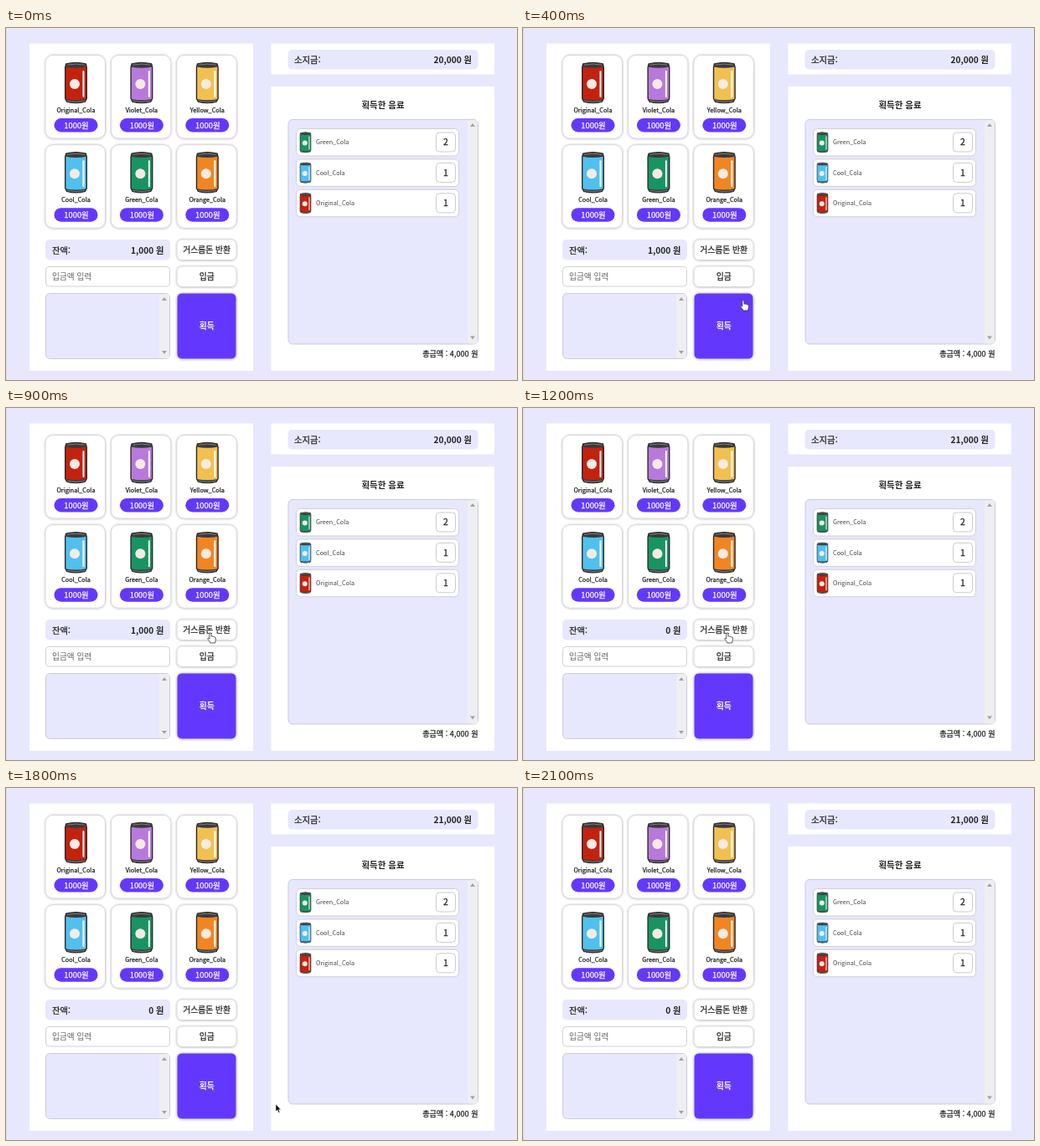
Recreate the animation shown at these times as an HTML page. Size 610 px wide and 421 px high, loop 3 s.

```html
<!DOCTYPE html>
<html lang="ko">
<head>
<meta charset="utf-8">
<style>
  html, body { margin: 0; width: 100%; height: 100%; overflow: hidden; background: #e7e8fd; }
  svg { display: block; width: 610px; height: 421px; }
  text { font-family: "Noto Sans CJK KR", "Noto Sans CJK JP", "Noto Sans", sans-serif; }
  .medium { stroke: currentColor; stroke-width: .25px; }
</style>
</head>
<body>
<svg id="stage" viewBox="0 0 610 421">
  <defs>
    <g id="can">
      <path d="M-12.8 6L-11.8 2Q0-1 11.8 2L12.8 6V43.5L11 47Q0 50 -11 47L-12.8 43.5Z" fill="currentColor" stroke="#2a2a2a" stroke-width="1.4" stroke-linejoin="round"/>
      <path d="M-12.5 5.6L-11.5 2Q0-1 11.5 2L12.5 5.6Q0 8 -12.5 5.6ZM-12.5 44Q0 46.6 12.5 44L11 47Q0 50 -11 47Z" fill="#3a3a3a"/>
      <path d="M-10.5 3.2Q0 .8 10.5 3.2M-10.5 46.2Q0 48.6 10.5 46.2" fill="none" stroke="#8d8d8d" stroke-width=".8"/>
      <path d="M9 11V41" stroke="#fff" stroke-width="2" stroke-linecap="round"/>
      <circle cx="-1.5" cy="26" r="6" fill="#f5ebe4"/>
    </g>
    <filter id="soft" x="-10%" y="-20%" width="120%" height="140%">
      <feDropShadow dx="0" dy=".3" stdDeviation="1.1" flood-color="#000" flood-opacity=".3"/>
    </filter>
  </defs>
  <g id="page"></g>
  <path id="hand" d="M-1.2 7.2V.9C-1.2-.5 1-.5 1 .9V4.3C1.4 3.6 2.8 3.7 3 4.6C3.5 4 4.6 4.3 4.8 5.1C5.5 4.7 6.3 5.1 6.3 6V8.6C6.3 10 5.5 10.5 5.4 12H-.2C-.4 10.5-2.1 9.3-3.1 7.2C-3.6 6-2.2 5.7-1.2 7.2Z" fill="#fff" stroke="#333" stroke-width=".8" stroke-linejoin="round"/>
  <path id="arrow" d="M0 0V9L2 7.2L3.4 10.4L4.9 9.7L3.5 6.7H6.2Z" fill="#111" stroke="#fff" stroke-width=".5"/>
</svg>
<script>
const $ = id => document.getElementById(id);
const LILAC = '#e7e8fd', PURPLE = '#6338fc', LINE = '#d2d2d6';
const COLORS = {
  Original: '#c3220f', Violet: '#b879dc', Yellow: '#f2c050',
  Cool: '#50c0ee', Green: '#189463', Orange: '#f18522'
};
let markup = '';

function box(x, y, w, h, fill, radius = 0, extra = '') {
  markup += `<rect x="${x}" y="${y}" width="${w}" height="${h}" rx="${radius}" fill="${fill}" ${extra}/>`;
}
function text(x, y, str, size, { anchor = 'start', weight = 400, fill = '#222', id = '' } = {}) {
  const style = weight === 500 ? 'class="medium"' : `font-weight="${weight}"`;
  markup += `<text x="${x}" y="${y}" font-size="${size}" text-anchor="${anchor}" ${style} fill="${fill}" color="${fill}" id="${id}">${str}</text>`;
}
function can(x, y, name, scale = 1) {
  markup += `<use href="#can" transform="translate(${x} ${y}) scale(${scale})" color="${COLORS[name]}"/>`;
}
const outline = (color = LINE, width = 1) => `stroke="${color}" stroke-width="${width}"`;
const raised = outline('#d8d8dc') + ' filter="url(#soft)"';

function scrollArea(x, y, w, h) {
  box(x + .5, y + .5, w - 1, h - 1, LILAC, 5, outline('#cacadb'));
  box(x + w - 13, y + 1, 12, h - 2, '#efeff1', 3);
  const cx = x + w - 7, bottom = y + h - 10;
  markup += `<path d="M${cx - 3} ${y + 9}l3-4l3 4ZM${cx - 3} ${bottom}l3 4l3-4Z" fill="#a3a3a6"/>`;
}

box(0, 0, 1, 421, '#d9daee');
box(28, 18.5, 267, 391.5, '#fff');
box(316.5, 18.5, 266.5, 37, '#fff');
box(316.5, 70, 266.5, 340, '#fff');

Object.keys(COLORS).forEach((name, i) => {
  const x = 47 + i % 3 * 78.4, y = 32.5 + Math.floor(i / 3) * 107.2, mid = x + 36;
  box(x, y, 71.5, 99.5, '#fff', 9, raised);
  can(mid + .5, y + 8.5, name);
  text(mid + .5, y + 68.5, name + '_Cola', 7.25, { anchor: 'middle', weight: 500 });
  box(mid - 25.5, y + 75.5, 52, 16.5, PURPLE, 8.25);
  text(mid + 1, y + 87.7, '1000원', 9.4, { anchor: 'middle', weight: 500, fill: '#fff' });
});

box(47, 253, 149, 24.5, LILAC, 5);
text(55, 269.7, '잔액:', 10.3, { weight: 500 });
text(188.5, 269.7, '', 10.2, { anchor: 'end', weight: 700, id: 'balance' });
box(47.5, 285.5, 148, 23.5, '#fff', 4, outline());
text(55, 300.5, '입금액 입력', 9.7, { fill: '#666' });
scrollArea(47, 317, 149, 79);

[[253, 24.5, '거스름돈 반환'], [285, 24.5, '입금'], [317, 79, '획득']].forEach(([y, h, label], i) => {
  const main = i === 2;
  box(204, y, 71, h, main ? PURPLE : '#fff', 6, raised);
  text(239.7, y + h / 2 + 3.3, label, 9.8,
    { anchor: 'middle', weight: main ? 700 : 500, fill: main ? '#fff' : '#222' });
});

box(336.5, 26, 227, 23.5, LILAC, 5);
text(344, 41.7, '소지금:', 10.4, { weight: 500 });
text(556, 41.7, '', 10.2, { anchor: 'end', weight: 700, id: 'wallet' });
text(450, 96.3, '획득한 음료', 10.5, { anchor: 'middle', weight: 700 });
scrollArea(336.5, 109, 227.5, 269.5);

[['Green', 2], ['Cool', 1], ['Original', 1]].forEach(([name, count], i) => {
  const y = 120.5 + i * 36.4;
  box(346.5, y, 194, 32.5, '#fff', 5, outline('#cfcfd8'));
  can(357.5, y + 4, name, .5);
  text(370, y + 18.8, name + '_Cola', 7.25, { fill: '#444' });
  box(513.5, y + 4.5, 23, 23, '#fff', 4, outline('#cbcbcf'));
  text(525, y + 19.8, count, 10.5, { anchor: 'middle', weight: 500 });
});
text(563.5, 393, '총금액 : 4,000 원', 9.1, { anchor: 'end', weight: 500 });
$('page').innerHTML = markup;

// Pointer stops: start time, shape, x, y
const STOPS = [
  [0], [300, 'arrow', 288, 390], [400, 'hand', 263, 326], [500, 'hand', 257, 318],
  [600, 'hand', 249.5, 295], [700, 'hand', 244, 269], [1600, 'hand', 245, 272],
  [1700, 'arrow', 283, 326], [1800, 'arrow', 322, 378], [1900, 'arrow', 335, 402],
  [2000, 'arrow', 342, 415], [2100]
];

function draw(now) {
  const t = now % 3000;
  const [, shape, x, y] = STOPS.findLast(stop => stop[0] <= t);
  for (const id of ['hand', 'arrow']) {
    $(id).style.display = id === shape ? '' : 'none';
    if (id === shape) $(id).setAttribute('transform', `translate(${x} ${y})`);
  }
  const returned = t >= 1200;
  $('balance').textContent = returned ? '0 원' : '1,000 원';
  $('wallet').textContent = returned ? '21,000 원' : '20,000 원';
  requestAnimationFrame(() => draw(performance.now() - start));
}
const start = performance.now();
draw(0);
</script>
</body>
</html>
```
